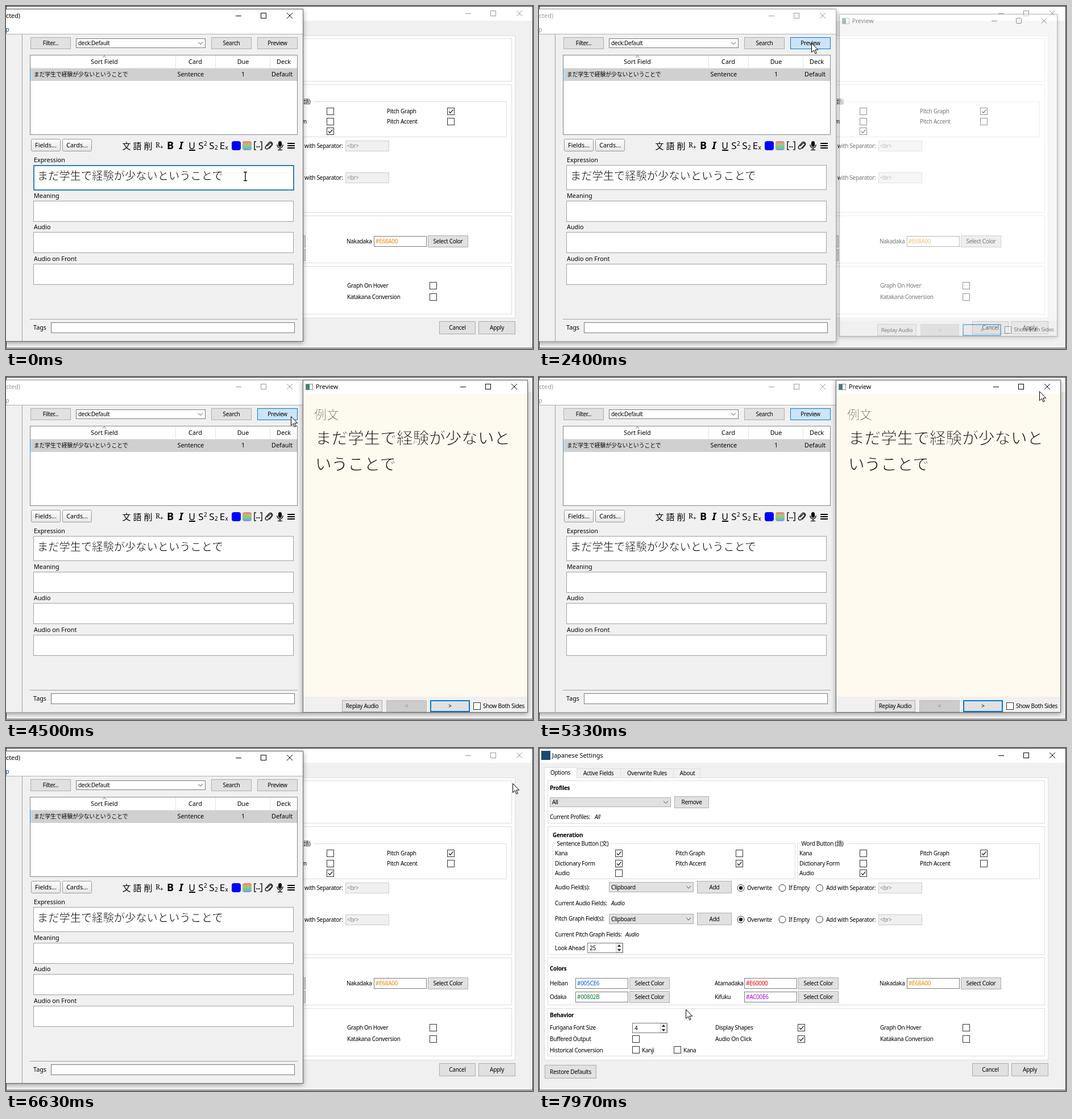
Write an HTML page that moves like this. It is 927 by 604 pixels and loops after 8 s.

```html
<!DOCTYPE html>
<html lang="ja">
<head>
<meta charset="utf-8">
<style>
html, body { margin: 0; width: 100%; height: 100%; overflow: hidden; }
svg { display: block; width: 927px; height: 604px; background: #f0f0f0; }
text { font: 10px 'Noto Sans', 'Noto Sans CJK JP', sans-serif; letter-spacing: -.03em; white-space: pre; }
rect { shape-rendering: crispEdges; }
path { fill: none; stroke: #222; }
.soft { shape-rendering: auto; }
.u { font-size: 10.8px; letter-spacing: 0; }
.m { text-anchor: middle; }
.b { font-weight: bold; }
.i { font-style: italic; }
.jp { font-family: 'Noto Sans CJK JP', 'Noto Sans CJK', sans-serif; letter-spacing: 0; }
/* A stroke in the paper colour thins the strokes of large glyphs. */
.light { font-weight: 300; stroke: #fff; stroke-width: .55px; }
#card text { stroke: #fffaf0; stroke-width: 1px; }
.title { fill: currentColor; }
.ctl { stroke: currentColor; }
.off { color: #999; }
.off .menu { opacity: .5; }
.shadow { filter: drop-shadow(0 2px 4px #0006); }
.off .shadow { stroke: #aaa; }
</style>
</head>
<body>
<svg id="stage" viewBox="0 0 927 604"></svg>
<script>
const SENTENCE = 'まだ学生で経験が少ないということで';

// Text is placed by its left edge (or middle, class m) and vertical centre.
const text = (s, x, y, cls = '', style = '') =>
  `<text x="${x}" y="${y + 3.6}" class="${cls}" style="${style}">${s.replace(/</g, '&lt;').replace(/>/g, '&gt;')}</text>`;
const box = (x, y, w, h, fill = '#fff', stroke = '#dcdcdc', extra = '') =>
  `<rect x="${x + .5}" y="${y + .5}" width="${w - 1}" height="${h - 1}" fill="${fill}" stroke="${stroke}" ${extra}/>`;
const fill = (x, y, w, h, color, extra = '') =>
  `<rect x="${x}" y="${y}" width="${w}" height="${h}" fill="${color}" ${extra}/>`;
const path = (d, extra = '') => `<path d="${d}" ${extra}/>`;
const button = (s, x, y, w, h, bg = '#e1e1e1', line = '#adadad', ink = '#000') =>
  box(x, y, w, h, bg, line) + text(s, x + w / 2, y + h / 2, 'm', 'fill:' + ink);
const chevron = (x, y) => path(`M${x - 4} ${y - 2}l4 4 4-4`, 'style="stroke:#444"');
const combo = (s, x, y, w, h, bg = '#e1e1e1', line = '#adadad') =>
  box(x, y, w, h, bg, line) + text(s, x + 4, y + h / 2) + chevron(x + w - 9, y + h / 2);
const check = (x, y, on) => box(x, y, 13, 13, '#fff', '#333') +
  (on ? path(`M${x + 3} ${y + 6.5}l2.5 3 5-6`, 'stroke-width="1.2"') : '');
const radio = (x, y, on) => `<circle cx="${x}" cy="${y}" r="6" fill="#fff" stroke="#333"/>` +
  (on ? `<circle cx="${x}" cy="${y}" r="3.3" fill="#222"/>` : '');
const spin = (s, x, y, w) => {
  const a = x + w - 7, tri = d => path(d, 'style="fill:#222;stroke:none"');
  return box(x, y, w, 18, '#fff', '#7a7a7a') + text(s, x + 4, y + 9) +
    box(x + w - 13, y + 1, 12, 16, '#f0f0f0', '#ccc') +
    tri(`M${a - 3} ${y + 7}h6l-3-4z`) + tri(`M${a - 3} ${y + 11}h6l-3 4z`);
};
// Minimise, maximise and close; x and y are the centre of the close cross.
const controls = (x, y) => path(`M${x - 95} ${y + .5}h10M${x - 50.5} ${y - 4.5}h9v9h-9z`, 'class="ctl" shape-rendering="crispEdges"') +
  path(`M${x - 5} ${y - 5}l10 10m0-10l-10 10`, 'class="ctl" id="x' + x + '"');

function settings() {
  let s = fill(0, 0, 927, 604, '#f0f0f0') + fill(0, 0, 927, 26, '#fff') + box(0, 0, 927, 603, 'none', '#333') +
    fill(4, 5, 16, 16, '#1d4a70') + text('Japanese Settings', 23, 13, 'u title') + controls(903, 13);

  s += box(9, 52, 887, 498) + box(66, 36, 78, 17, '#f0f0f0') + box(143, 36, 94, 17, '#f0f0f0') +
    box(236, 36, 48, 17, '#f0f0f0') + box(9, 34, 58, 19) + fill(10, 51, 56, 3, '#fff') +
    text('Options', 37.5, 43, 'm') + text('Active Fields', 104.5, 44, 'm') +
    text('Overwrite Rules', 190, 44, 'm') + text('About', 261, 44, 'm');
  for (const [y, h] of [[57, 76], [138, 226], [369, 84], [458, 85]]) s += box(15, y, 875, h);
  s += text('Profiles', 19, 70, 'b') + text('Generation', 24, 153, 'b') +
    text('Colors', 19, 388, 'b') + text('Behavior', 19, 470, 'b');

  s += combo('All', 19, 87, 213, 17) + button('Remove', 238, 85, 61, 21) +
    text('Current Profiles:', 19, 121) + text('All', 98, 121, 'i');

  const group = (x, title, w, marks) => box(x, 168, 427, 63) + fill(x + 5, 166, w, 5, '#fff') + text(title, x + 7.5, 168) +
    ['Kana', 'Dictionary Form', 'Audio', 'Pitch Graph', 'Pitch Accent'].map((name, i) => {
      const dx = i < 3 ? 0 : 212, y = [185, 203, 220][i % 3];
      return text(name, x + 4 + dx, y) + check(x + 110 + dx, y - 6, marks[i]);
    }).join('');
  s += group(24, 'Sentence Button (文)', 98, [1, 1, 0, 0, 1]) + group(454, 'Word Button (語)', 82, [0, 0, 1, 1, 0]);

  for (const [y, name, current, x] of [[245, 'Audio Field(s):', 'Current Audio Fields:', 127], [300.5, 'Pitch Graph Field(s):', 'Current Pitch Graph Fields:', 152]]) {
    const top = Math.round(y);
    s += text(name, 28, y) + combo('Clipboard', 123, top - 9, 149, 18) + button('Add', 278, top - 11, 61, 22) +
      radio(355, y + 1.5, 1) + text('Overwrite', 366, y + 1.5) + radio(428, y + 1.5) + text('If Empty', 439, y + 1.5) +
      radio(493.5, y + 1.5) + text('Add with Separator:', 505, y + 1.5) +
      box(597, top - 8, 77, 19, '#f0f0f0', '#ccc') + text('<br>', 600, y + 1.5, '', 'fill:#888') +
      text(current, 28, y + 28) + text('Audio', x, y + 28, 'i');
  }
  s += text('Look Ahead', 28, 352) + spin('25', 85, 343, 63);

  const color = (name, x, y, hex, bx) => text(name, x, y) + box(bx, y - 9, 93, 19, '#fff', '#7a7a7a') +
    text(hex, bx + 3, y + .5, '', 'fill:' + hex) + button('Select Color', bx + 95, y - 10, 71, 21);
  s += color('Heiban', 19, 414, '#005CE6', 64) + color('Atamadaka', 309, 414, '#E60000', 361) +
    color('Nakadaka', 599, 414, '#E68A00', 647) + color('Odaka', 19, 438, '#00802B', 64) + color('Kifuku', 309, 438, '#AC00E6', 361);

  s += text('Furigana Font Size', 19, 492) + spin('4', 164, 484, 62) +
    text('Buffered Output', 19, 512) + check(164, 506) + text('Historical Conversion', 19, 532) +
    check(164, 525) + text('Kanji', 181, 532) + check(237, 525) + text('Kana', 254, 532) +
    text('Display Shapes', 310, 492) + check(455, 486, 1) + text('Audio On Click', 310, 512) + check(455, 506, 1) +
    text('Graph On Hover', 600, 492) + check(745, 486) + text('Katakana Conversion', 600, 512) + check(745, 506);
  return s + button('Restore Defaults', 10, 558, 91, 24) + button('Cancel', 762, 555, 64, 23) + button('Apply', 831, 555, 65, 23);
}

function toolbar() {
  const glyph = (s, x, size, style = '') => text(s, x, 248.4, 'm', `font-size:${size}px;letter-spacing:0;${style}`);
  const script = (s, sub, x, dy) => glyph(s, x - 3, 17) + text(sub, x + 2, 248.4 + dy, '', 'font-size:10px');
  let s = glyph('文', 212, 15) + glyph('語', 231, 15) + glyph('削', 250, 15) +
    text('R', 263, 245, '', "font:12px 'Noto Serif',serif") + text('+', 271, 248.5, '', 'font-size:10px') +
    glyph('B', 289, 18, 'font-weight:bold') + glyph('I', 308, 18, 'font-weight:bold;font-style:italic') +
    glyph('U', 327, 16) + fill(322, 253, 11, 1.5, '#000') +
    script('S', '2', 346, -6) + script('S', '2', 365, 1) + script('E', 'x', 383.5, 1);
  s += fill(397, 238, 16, 16, '#00f', 'rx="4" class="soft"') + fill(416, 238, 16, 16, 'url(#hue)', 'rx="4" class="soft"') +
    path('M440 239h-3v14h3M447 239h3v14h-3', 'stroke-width="1.6"') +
    [441, 443.5, 446].map(x => `<circle cx="${x}" cy="248" r=".9"/>`).join('') +
    path('M459 247l5-5a2 2 0 0 1 3 3l-6 6a2.8 2.8 0 0 1-4-4l6-7a3.6 3.6 0 0 1 5 5l-5 6', 'stroke-width="1.5"') +
    fill(479, 238, 6, 10, '#000', 'rx="3" class="soft"') + path('M477 244c0 8 10 8 10 0M482 250v3M478 253.5h8', 'stroke-width="1.6"');
  return s + [241, 245, 249].map(y => fill(495, y, 13, 2, '#000')).join('');
}

function browser() {
  let s = box(-6, 5, 529, 586, '#f0f0f0', '#666', 'class="shadow"') + fill(0, 6, 522, 43, '#fff') + fill(0, 49, 522, 1, '#b0b0b0') +
    fill(28, 50, 1, 540, '#a0a0a0') + text('cted)', 0, 17.5, 'u title') + text('p', -1, 41, 'u menu', 'fill:#0b3a75') + controls(499, 17);
  s += button('Filter...', 43, 55, 71, 21) + combo('deck:Default', 123, 57, 228, 17, '#fff', '#7a7a7a') + button('Search', 361, 55, 71, 21) +
    `<g id="previewButton">${button('Preview', 442, 55, 71, 21)}</g>`;

  s += box(42, 86, 471, 141, '#fff', '#828790') + fill(46, 110, 466, 22, '#d0d0d0') + fill(43, 110, 3, 22, '#b5daf3') +
    fill(43, 132, 3, 94, '#f3f3f3') + fill(43, 109, 469, 1, '#e5e5e5') + path('M170 90.5l3-3 3 3', 'style="stroke:#555"') +
    [298, 368, 464].map(x => fill(x, 87, 1, 22, '#e3e3e3')).join('') +
    text('Sort Field', 173, 98, 'u m') + text('Card', 333, 98, 'u m') + text('Due', 417, 98, 'u m') + text('Deck', 488.5, 98, 'u m') +
    text(SENTENCE, 49, 120.5, 'jp', 'font-size:9.75px') + text('Sentence', 301.5, 120.5, 'u') + text('1', 417, 120.5, 'u m') + text('Default', 467, 120.5, 'u');

  for (const [name, x] of [['Fields...', 44], ['Cards...', 99]])
    s += box(x, 234, 52, 22, 'url(#key)', '#999', 'rx="2" class="soft"') + text(name, x + 26, 245, 'u m');
  s += toolbar();

  for (const [name, y, h] of [['Expression', 271, 44], ['Meaning', 334, 37], ['Audio', 389, 37], ['Audio on Front', 445, 37]])
    s += text(name, 49, y, 'u') + box(48, y + 9, 458, h, '#fff', '#a0a0a0');
  s += fill(49, 281, 457, 43, 'none', 'id="focus" stroke="#2a80c0" stroke-width="2"') +
    text(SENTENCE, 55, 302, 'jp light', 'font-size:19.25px') + fill(382, 289, 1, 22, '#000', 'id="caret"');
  return s + fill(42, 551, 471, 1, '#a0a0a0') + text('Tags', 48, 566, 'u') + box(79, 557, 429, 19, '#fff', '#7a7a7a');
}

function preview() {
  const line = (s, y) => text(s, 544, y, 'jp light', 'font-size:28.6px');
  return box(522, 5, 396, 586, '#f0f0f0', '#666', 'class="shadow"') + fill(523, 6, 394, 24, '#fff') +
    box(527, 12, 13, 11, '#fff', '#888') + fill(528, 13, 6, 9, '#3f8074') + text('Preview', 545, 17.5, 'u') +
    fill(871, 6, 46, 24, '#e81123', 'id="closeHover"') + controls(894, 17) +
    fill(523, 30, 394, 533, '#fffaf0', 'id="page"') +
    `<g id="card">${text('例文', 542, 70.5, 'jp light', 'font-size:22px;fill:#444')}${line(SENTENCE.slice(0, 12), 114)}${line(SENTENCE.slice(12), 160.5)}</g>` +
    button('Replay Audio', 591, 569, 71, 21) + button('<', 669, 569, 71, 21, '#ccc', '#bfbfbf', '#888') + button('>', 746, 569, 70, 21, '#e1e1e1', '#0078d7') +
    box(747, 570, 68, 19, 'none', '#0078d7') + check(822, 573) + text('Show Both Sides', 839, 579);
}

const $ = id => document.getElementById(id);
$('stage').innerHTML = `<defs>
  <linearGradient id="hue" x2="0" y2="1"><stop stop-color="#f07878"/><stop offset=".33" stop-color="#c8b878"/><stop offset=".6" stop-color="#68d888"/><stop offset="1" stop-color="#8890f0"/></linearGradient>
  <linearGradient id="key" x2="0" y2="1"><stop stop-color="#fdfdfd"/><stop offset="1" stop-color="#e6e6e6"/></linearGradient></defs>
  <g id="settings">${settings()}</g><g id="browser">${browser()}</g><g id="preview">${preview()}</g>
  <g id="arrow">${path('M.5.5v16l3.8-3.6 2.6 6 2.4-1-2.6-5.8h5z', 'style="fill:#fff;stroke:#000"')}</g>
  <g id="beam">${path('M-3 -7.5h2.5l.5 .7.5-.7h2.5M-3 7.5h2.5l.5-.7.5.7h2.5M0-7v14', 'style="stroke:#000" stroke-width="1.3"')}</g>`;

// Pointer stops: time, x, y.
const ROUTE = [[0, 421, 300], [970, 421, 300], [1100, 424, 295], [1300, 440, 220], [1500, 461, 120], [1670, 473, 79], [1780, 479, 65],
  [4400, 479, 65], [4520, 505, 70], [4800, 690, 62], [5050, 810, 45], [5200, 852, 36], [5330, 880, 25], [5470, 896, 13], [5860, 896, 13], [5870, 896, 12],
  [6200, 896, 12], [6400, 895, 32], [6630, 891, 62], [6900, 891, 62], [7100, 820, 110], [7350, 660, 200], [7550, 600, 236], [7730, 488, 298], [7860, 345, 395], [7970, 258, 460], [8000, 258, 460]];

function pointer(t) {
  const i = ROUTE.findIndex(p => p[0] > t), [t0, x0, y0] = ROUTE[i - 1], [t1, x1, y1] = ROUTE[i];
  const k = (t - t0) / (t1 - t0);
  return [Math.round(x0 + (x1 - x0) * k), Math.round(y0 + (y1 - y0) * k)];
}
const show = (id, on) => $(id).style.display = on ? '' : 'none';
const clamp = p => Math.min(1, Math.max(0, p));

function draw(t) {
  const [x, y] = pointer(t), inText = t < 1300 && y > 280;
  show('arrow', !inText);
  show('beam', inText);
  $(inText ? 'beam' : 'arrow').setAttribute('transform', `translate(${x} ${y})`);

  show('focus', t < 2000);
  show('caret', t >= 430 && t < 970 || t >= 1500 && t < 2000);
  const lit = t >= 1690 && t < 6130, face = $('previewButton').firstChild;
  face.setAttribute('fill', lit ? t < 2000 ? '#e5f1fb' : '#cce4f7' : '#e1e1e1');
  face.setAttribute('stroke', lit ? '#0078d7' : '#adadad');

  const away = t >= 2300 && t < 6130, front = t >= 7450;
  $('browser').setAttribute('class', away ? 'off' : '');
  $('settings').setAttribute('class', front ? '' : 'off');
  show('browser', !front);

  // The preview fades evenly while its size eases out.
  const open = t < 6100 ? clamp((t - 2300) / 220) : 1 - clamp((t - 6100) / 200);
  const scale = 1 - .11 * (1 - open) ** 2;
  show('preview', open > 0);
  $('preview').setAttribute('opacity', open);
  $('preview').setAttribute('transform', `translate(720 298) scale(${scale}) translate(-720 -298)`);
  $('page').setAttribute('fill', t < 2630 ? '#fff' : '#fffaf0');
  show('card', t >= 3070);
  const hover = t >= 5360;
  show('closeHover', hover);
  $('x894').style.stroke = hover ? '#fff' : '#000';
}

(function frame() {
  draw(performance.now() % 8000);
  requestAnimationFrame(frame);
})();
</script>
</body>
</html>
```
